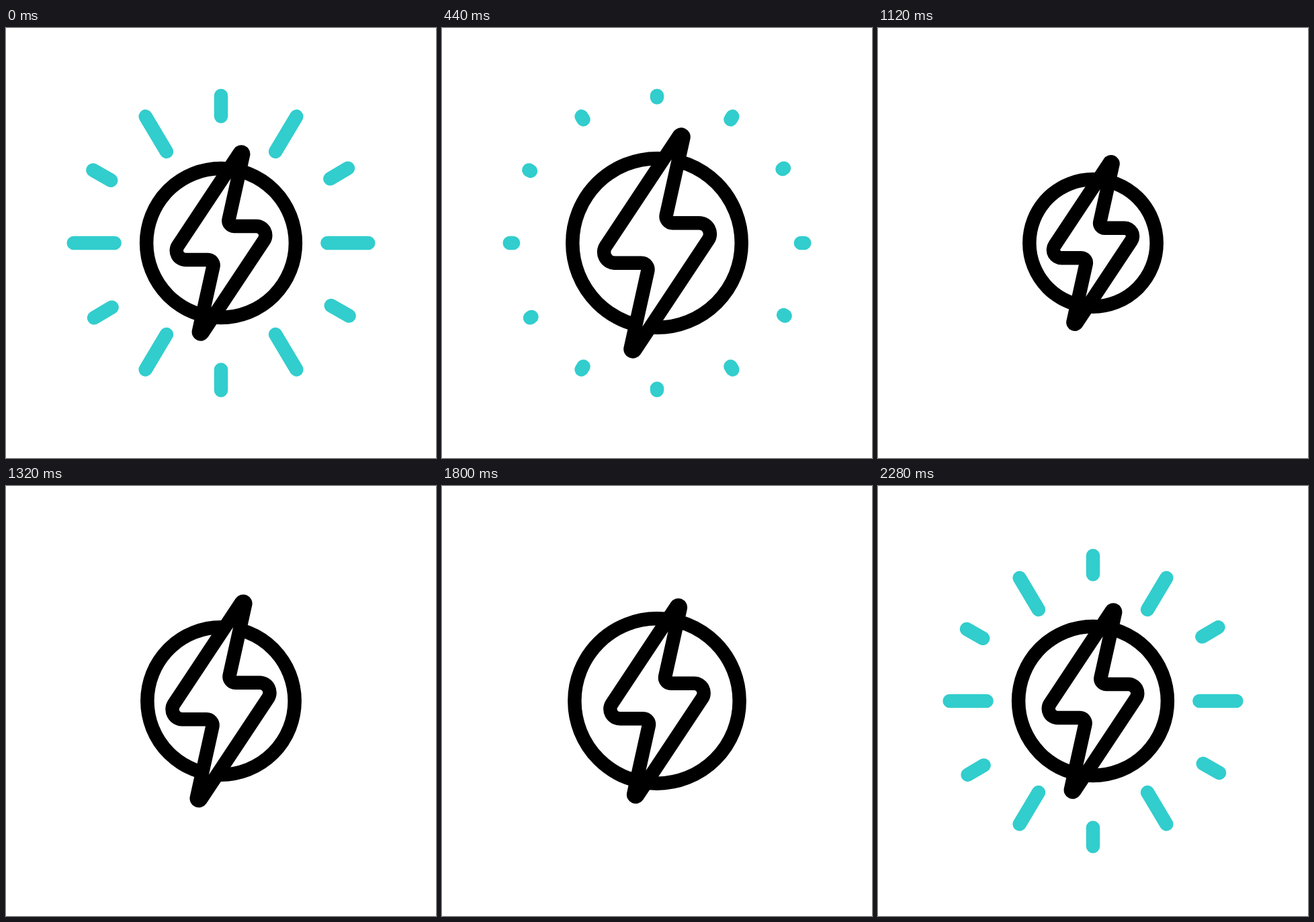
These frames come from a looping animation (640 by 640 pixels, 2.32 s). An HTML page:

```html
<!DOCTYPE html>
<html lang="en">
<head>
<meta charset="utf-8">
<title>Energy pulse</title>
<style>
  html, body { margin: 0; width: 100%; height: 100%; overflow: hidden; background: #fff; }
  svg { display: block; width: 100%; height: 100%; }
</style>
</head>
<body>
<svg viewBox="-320 -320 640 640" fill="none" stroke-width="20.5" stroke-linecap="round" stroke-linejoin="round">
  <path id="rays" stroke="#32cdcd"/>
  <circle id="ring" stroke="#000"/>
  <path id="bolt" stroke="#000" fill="#fff"/>
</svg>
<script>
const LOOP = 2320;
const RING_RADIUS = 110.9;
const RAY_END = 219.3;
const LONG_START = 158.4;
const SHORT_START = 188.5;

// Keys are [time, scale] pairs, eased in and out between them.
const boltKeys = [[33, 1], [500, 1.2], [1000, 0.838], [1500, 1.2], [1950, 1]];
const ringKeys = [[133, 1], [600, 1.183], [1100, 0.852], [1600, 1.183], [2050, 1]];

// Sharp corners as [x, y, rounding]; the other half is the point reflection.
const half = [[36.6, -147.6, 3], [9.4, -25, 8.2], [78, -25, 13.6]];
const corners = [...half, ...half.map(([x, y, r]) => [-x, -y, r])];

// Ray directions in degrees with their inner ends.
const rays = [
  [0, LONG_START], [29.65, SHORT_START], [59.2, LONG_START],
  [90, SHORT_START], [120.8, LONG_START], [149.5, SHORT_START]
].flatMap(([angle, start]) => [[angle, start], [angle + 180, start]]);

const [raysEl, ringEl, boltEl] = ["rays", "ring", "bolt"].map(id => document.getElementById(id));

function ease(t, from, to) {
  const x = Math.min(1, Math.max(0, (t - from) / (to - from)));
  return x * x * (3 - 2 * x);
}

function valueAt(keys, t) {
  let value = keys[0][1];
  for (let i = 1; i < keys.length; i++) {
    const [t0, v0] = keys[i - 1];
    const [t1, v1] = keys[i];
    value += (v1 - v0) * ease(t, t0, t1);
  }
  return value;
}

function toward([x, y], [tx, ty]) {
  const d = Math.hypot(tx - x, ty - y);
  return [(tx - x) / d, (ty - y) / d];
}

function roundedPath(points, scale) {
  const n = points.length;
  const at = (p, dir, len) =>
    `${((p[0] + dir[0] * len) * scale).toFixed(2)} ${((p[1] + dir[1] * len) * scale).toFixed(2)}`;
  return points.map((p, i) => {
    const a = toward(p, points[(i + n - 1) % n]);
    const b = toward(p, points[(i + 1) % n]);
    const angle = Math.acos(a[0] * b[0] + a[1] * b[1]);
    const cut = p[2] / Math.tan(angle / 2);
    const r = (p[2] * scale).toFixed(2);
    const sweep = a[0] * b[1] - a[1] * b[0] < 0 ? 1 : 0;
    return `${i ? "L" : "M"}${at(p, a, cut)}A${r} ${r} 0 0 ${sweep} ${at(p, b, cut)}`;
  }).join("") + "Z";
}

function rayPath(from, to) {
  if (to - from < 0.001) return "";
  return rays.map(([angle, start]) => {
    const c = Math.cos(angle * Math.PI / 180);
    const s = Math.sin(angle * Math.PI / 180);
    const point = k => {
      const r = start + (RAY_END - start) * k;
      return `${(r * c).toFixed(2)} ${(r * s).toFixed(2)}`;
    };
    return `M${point(from)}L${point(to)}`;
  }).join("");
}

function draw(t) {
  boltEl.setAttribute("d", roundedPath(corners, valueAt(boltKeys, t)));
  ringEl.setAttribute("r", RING_RADIUS * valueAt(ringKeys, t));
  // Rays retract outward, then grow back from their inner ends.
  const d = t < 1160 ? rayPath(ease(t, 33, 532), 1) : rayPath(0, ease(t, 1820, 2391));
  raysEl.setAttribute("d", d);
}

function tick() {
  draw(performance.now() % LOOP);
  requestAnimationFrame(tick);
}
tick();
</script>
</body>
</html>
```
